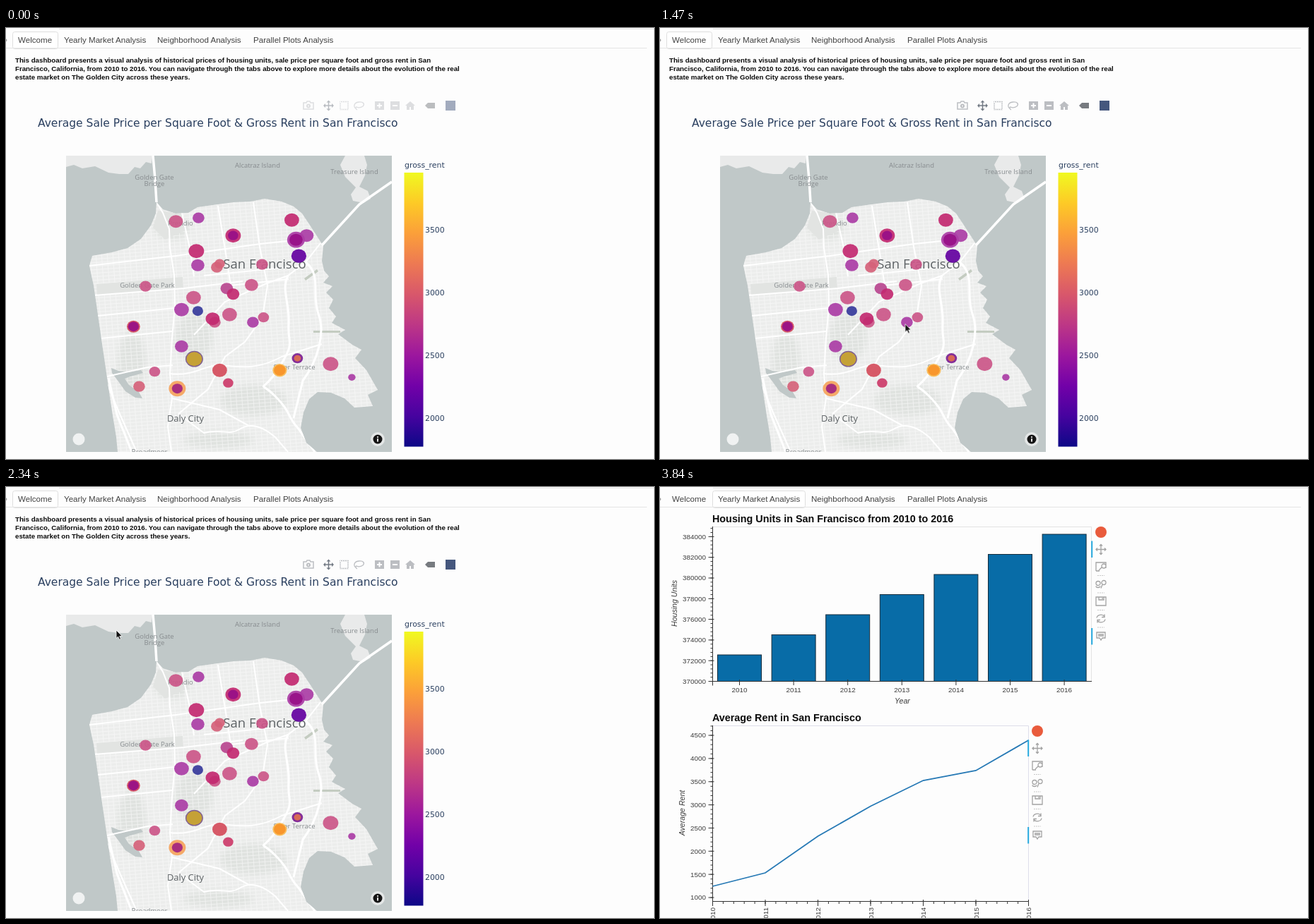
Recreate the animation shown at these times as an HTML page. Size 917 by 611 pixels, loop 3870 ms.

```html
<!DOCTYPE html>
<html lang="en">
<head>
<meta charset="utf-8">
<title>Housing dashboard</title>
<style>
html, body { margin: 0; width: 100%; height: 100%; overflow: hidden; background: #fdfdfd; }
svg { display: block; width: 100vw; height: 100vh; }
text { font-family: "Liberation Sans", Arial, sans-serif; fill: #3c3c3c; }
.tab { font-size: 11.6px; fill: #424242; }
.bold { font-weight: bold; fill: #0c0c0c; }
.intro { font-size: 9.72px; }
.head { font-size: 14.35px; }
.plot { font-family: "DejaVu Sans", Verdana, sans-serif; fill: #2a3f5f; }
.place { font-family: "Open Sans", sans-serif; text-anchor: middle; fill: #868b8e; font-size: 9.4px; }
.tick { font-size: 9.9px; }
.end { text-anchor: end; }
.mid { text-anchor: middle; }
.axis { font-size: 10.6px; font-style: italic; text-anchor: middle; }
.tip text { font-size: 11.7px; fill: #fff; }

.play { animation: 3870ms linear infinite; }
#welcome { animation-name: first; }
#yearly { animation-name: second; }
#modebar { animation-name: modebar; }
#tip { animation-name: tip; }
#hover { animation-name: hover; }
#cursor { animation-name: travel; }
#arrow { animation-name: arrow; }
#hand { animation-name: hand; }
#welcome, #yearly, #tip, #hover, #arrow, #hand { animation-timing-function: step-end; }

@keyframes first { 0% { visibility: visible } 82.2%, 100% { visibility: hidden } }
@keyframes second { 0% { visibility: hidden } 82.2%, 100% { visibility: visible } }
@keyframes modebar {
  0% { opacity: .5 } 5%, 31% { opacity: 0 } 37%, 68% { opacity: 1 } 73%, 100% { opacity: 0 }
}
@keyframes tip { 0% { opacity: 0 } 40% { opacity: 1 } 50.5%, 100% { opacity: 0 } }
@keyframes hover { 0% { opacity: 0 } 72.9% { opacity: 1 } 82.2%, 100% { opacity: 0 } }
@keyframes arrow { 0% { opacity: 0 } 3% { opacity: 1 } 72.9% { opacity: 0 } 85.5%, 100% { opacity: 1 } }
@keyframes hand { 0% { opacity: 0 } 72.9% { opacity: 1 } 85.5%, 100% { opacity: 0 } }
@keyframes travel {
  0%, 3% { transform: translate(640px, 616px); animation-timing-function: ease-out }
  10.85% { transform: translate(437px, 356px); animation-timing-function: ease-in-out }
  28.68% { transform: translate(301px, 338px); animation-timing-function: ease-in-out }
  40%, 50% { transform: translate(350px, 425px); animation-timing-function: ease-in-out }
  60.47% { transform: translate(156px, 203px); animation-timing-function: ease-in-out }
  73.5%, 84% { transform: translate(108px, 15px); animation-timing-function: ease-in }
  97%, 100% { transform: translate(744px, 622px) }
}
</style>
</head>
<body>
<svg viewBox="0 0 917 611" preserveAspectRatio="none">
  <defs>
    <linearGradient id="plasma" x1="0" y1="1" x2="0" y2="0"></linearGradient>
    <pattern id="blocks" width="8" height="5" patternUnits="userSpaceOnUse" patternTransform="rotate(-4)">
      <path d="M0 .5H8M.5 0V5" stroke="#fafafa" stroke-width=".9"/>
    </pattern>
    <clipPath id="frame"><rect x="85" y="181" width="461" height="420"/></clipPath>
    <path id="city" d="M213 247L222 257 240 263 258 262 271 254 300 250 322 247 346 246 366 242 390 246 407 253 419 263 429 278 440 295 449 309 447 330 450 344 457 352 449 361 462 366 453 375 463 385 457 397 467 409 461 418 480 428 470 434 490 449 503 456 494 468 510 485 526 513 512 520 519 536 493 538 479 525 460 517 441 516 429 526 421 545 417 567 425 588 440 601H158L156 580 148 530 140 475 132 420 124 365 118 337 122 323 150 318 172 312 191 299 205 280 212 263Z"/>
    <clipPath id="land"><use href="#city"/></clipPath>
    <filter id="soft"><feGaussianBlur stdDeviation="5"/></filter>
  </defs>

  <rect width="917" height="611" fill="#fdfdfd"/>

  <g id="welcome" class="play">
    <rect x="9.5" y="5.5" width="64" height="24" rx="3" fill="#fff" stroke="#dedede"/>
    <g id="intro"></g>
    <g id="modebar" class="play" fill="none" stroke="#bcbec2" stroke-width="2">
      <path d="M421 106h4l1-2h4l1 2h4v9h-14zM473 104.500h11v11h-11z" stroke-width="1.500"/>
      <circle cx="428" cy="110.500" r="2"/>
      <path d="M473 104.500h11v11h-11z" stroke="#fdfdfd" stroke-dasharray="1 2"/>
      <path d="M450 110H463M456.500 104V116" stroke="#737a84" stroke-width="1.500"/>
      <path d="M449 110l3-3v6zM464 110l-3-3v6zM456.500 102.500l-3 3h6zM456.500 117.500l-3-3h6z" fill="#737a84" stroke="none"/>
      <path d="M496 115c-5-3-4-9 3-10 7-1 9 3 6 6-3 2-7 2-9 1-2 0-1 3 1 4" stroke-width="1.300"/>
      <path d="M522 104h13v12h-13zM544 104h13v12h-13z" fill="#bcbec2" stroke="none"/>
      <path d="M525 110h7M528.500 106.500v7M547 110h7" stroke="#fff"/>
      <path d="M565 110l7-6 7 6h-2v6h-4v-4h-2v4h-4v-6z" fill="#bcbec2" stroke="none"/>
      <path d="M593 110l4-4h10v8h-10z" fill="#777b80" stroke="none"/>
      <rect x="622" y="103" width="14" height="14" fill="#45577d" stroke="none"/>
    </g>
    <text class="plot" x="45" y="140" font-size="15.5">Average Sale Price per Square Foot &amp; Gross Rent in San Francisco</text>

    <g clip-path="url(#frame)">
      <rect x="85" y="181" width="461" height="420" fill="#c0c8c8"/>
      <path d="M85 181H207L206 192 198 190 190 199 182 197 173 207 160 207 145 205 126 196 108 199 96 194 85 197ZM480 181H507L511 194 508 209 500 225 512 231 516 242 506 248 491 245 488 236 495 226 480 211 473 194Z" fill="#e9eaea"/>
      <use href="#city" fill="#ecedec"/>
      <g clip-path="url(#land)">
        <g fill="#dfe2df" filter="url(#soft)">
          <ellipse cx="235" cy="283" rx="25" ry="17"/>
          <ellipse cx="266" cy="438" rx="27" ry="34"/>
          <ellipse cx="350" cy="528" rx="47" ry="22"/>
          <ellipse cx="178" cy="475" rx="20" ry="45"/>
          <ellipse cx="300" cy="584" rx="50" ry="12"/>
        </g>
        <rect x="85" y="181" width="461" height="420" fill="url(#blocks)" opacity=".65"/>
        <path d="M128 363L250 353 251 369 129 379ZM215 259L250 263 258 285 225 300 208 283Z" fill="#e2e4e2"/>
        <path d="M149 482l10 4 14 2 18-3 3 4-18 5-8 3 6 9 14 10 5 9-10-1-14-9-10-14-9-12z" fill="#c0c8c8"/>
        <path d="M435 429h38v3h-38zM422 355l18-13 2 3-18 13z" fill="#c4ccc1"/>
        <g fill="none" stroke="#fff" stroke-width="2">
          <path d="M213 247L222 262 231 285 232 312 238 350 239 395 235 440 232 490 235 525 229 565 234 601"/>
          <path d="M118 337L240 323 360 306 435 298M125 379L252 369 335 359M130 408L238 397M134 440L235 430M143 494L200 481 236 478"/>
          <path d="M249 262L260 312 266 352M300 252L311 320 318 365M350 247L359 310 370 365 363 410 338 445 310 466 286 512 244 547"/>
          <path d="M445 305L424 332 399 351 369 362 310 388 266 435M280 351L430 336M318 365L400 356"/>
          <path d="M232 490C265 495 283 476 305 478S354 486 390 466L447 448M133 480L160 545 185 601"/>
          <path d="M244 547L280 574C305 568 316 578 330 569S360 562 381 580L399 601M235 525L302 541 344 564"/>
        </g>
        <path d="M399 351C389 372 402 390 400 420S411 442 386 482 356 497 380 521 398 551 413 567L437 601M424 332C447 350 432 378 442 405S442 470 420 500L407 553M145 496L157 548 178 601" fill="none" stroke="#fff" stroke-width="3"/>
      </g>
      <path d="M208 181L211 215 213 247M447 308L500 250 546 218" fill="none" stroke="#fff" stroke-width="3.5"/>
      <g id="places"></g>
      <circle cx="103" cy="583" r="8.500" fill="#f0f2f2"/>
      <circle cx="526" cy="583" r="10" fill="#e4e7e7"/>
      <circle cx="526" cy="583" r="6.500" fill="#151515"/>
      <path d="M526 579v1.800M526 582v4.500" stroke="#fff" stroke-width="1.800"/>
      <g id="homes" fill-opacity=".92"></g>
    </g>

    <rect x="563.5" y="205" width="27" height="388.5" fill="url(#plasma)"/>
    <g id="scale"></g>

    <g id="tip" class="play tip">
      <path d="M364 389H585V445H364V423L357 417 364 411Z" fill="#99078c" stroke="#f4e5f2"/>
      <g id="tiptext"></g>
    </g>
    <rect id="hover" class="play" x="74" y="6" width="132" height="22" fill="#e6e6e6"/>
  </g>

  <g id="yearly" class="play">
    <rect x="74.500" y="5.500" width="131" height="24" rx="3" fill="#fff" stroke="#dedede"/>
    <g id="charts"></g>
  </g>

  <path d="M75 1.500H917M0 28.500H907" stroke="#e5e5e5"/>
  <path d="M0 15.500l1 1.500-1 2" fill="none" stroke="#888"/>
  <g id="tabs"></g>

  <g id="cursor" class="play">
    <path id="arrow" class="play" d="M0 0V11.500L2.600 9.200 4.500 13.300 6.500 12.400 4.700 8.500H8.300Z" fill="#111" stroke="#fff" stroke-width=".8"/>
    <path id="hand" class="play" d="M0 1C0-.5 2-.5 2.200 1L3 5 4 4.300 5 5.200 6 4.600 7 5.700 8.200 5.500 8.700 9 7.500 13H2.200L-2 8.300C-2.500 7-1 6.500 .9 8Z" fill="#fff" stroke="#222"/>
  </g>
</svg>

<script>
const put = (id, parts) => { document.getElementById(id).innerHTML = parts.join(''); };
const text = (cls, x, y, s, extra = '') => `<text class="${cls}" x="${x}" y="${y}" ${extra}>${s}</text>`;
const path = (d, stroke = '#333', extra = '') => `<path d="${d}" fill="none" stroke="${stroke}" ${extra}/>`;
const upright = (cls, x, y, s) => text(cls, x, y, s, `transform="rotate(-90 ${x} ${y})"`);
const range = n => [...Array(n).keys()];

put('tabs', [[17, 'Welcome'], [82, 'Yearly Market Analysis'], [214, 'Neighborhood Analysis'],
  [350, 'Parallel Plots Analysis']].map(([x, s]) => text('tab', x, 21, s)));

put('intro', [
  'This dashboard presents a visual analysis of historical prices of housing units, sale price per square foot and gross rent in San',
  'Francisco, California, from 2010 to 2016. You can navigate through the tabs above to explore more details about the evolution of the real',
  'estate market on The Golden City across these years.'
].map((s, i) => text('bold intro', 13, 49 + 12.2 * i, s)));

put('places', [
  [356, 198, 'Alcatraz Island'], [210, 215, 'Golden Gate'], [210, 224, 'Bridge'],
  [493, 207, 'Treasure Island'], [247, 280, 'Presidio'], [200, 368, 'Golden Gate Park'],
  [408, 484, 'Silver Terrace'], [203, 604, 'Broadmoor'],
  [254, 558, 'Daly City', 12.9], [366, 341, 'San Francisco', 18.5]
].map(([x, y, s, size = 9.5]) =>
  text('place', x, y, s, `style="font-size:${size}px${size > 10 ? ';fill:#5c6164' : ''}"`)));

// Each colour holds x, y and radius; rings come before their cores.
const homes = {
  '#cb5688': [[240, 274, 9.5], [265, 382, 10], [316, 406, 10], [347, 364, 9], [459, 476, 10.5], [197, 366, 8],
    [364, 410, 7.5], [362, 335, 8], [210, 487, 7.5], [295, 417, 8]],
  '#b9468f': [[312, 369, 8.5]],
  '#d5627a': [[298, 339, 8], [302, 334, 7], [188, 508, 8]],
  '#c22970': [[404, 272, 10], [269, 316, 10.5], [321, 377, 8.5], [292, 412, 9.5], [321, 294, 10.5]],
  '#cc3b69': [[314, 503, 7]],
  '#aa3da5': [[272, 269, 8], [425, 294, 9.5], [271, 336, 9], [248, 399, 10], [248, 451, 9], [349, 417, 8],
    [489, 495, 5], [410, 300, 12]],
  '#d44c5b': [[180, 423, 9], [302, 485, 10]],
  '#970f87': [[321, 294, 7], [410, 300, 9], [180, 423, 7.3]],
  '#6300a0': [[414, 323, 10.2]],
  '#36399b': [[271, 401, 7.3]],
  '#77548a': [[266, 469, 12]],
  '#cba72f': [[266, 469, 10.5]],
  '#f5a35c': [[242, 511, 11.5]],
  '#a12480': [[242, 511, 7.3]],
  '#fabb52': [[387, 485, 9.7]],
  '#f79328': [[387, 485, 8]],
  '#7b1d91': [[412, 468, 7.5]],
  '#e17050': [[412, 468, 4.7]]
};
// The dots are slightly wider than tall.
put('homes', Object.entries(homes).flatMap(([fill, spots]) => spots.map(([x, y, r]) =>
  `<ellipse cx="${x + .4}" cy="${y + .2}" rx="${r * 1.04}" ry="${r * .95}" fill="${fill}"/>`)));

const plasma = ['0d0887', '46039f', '7201a8', '9c179e', 'bd3786', 'd8576b', 'ed7953', 'fb9f3a', 'fdca26', 'f0f921'];
put('plasma', plasma.map((c, i) => `<stop offset="${i / 9}" stop-color="#${c}"/>`));
put('scale', [text('plot', 564, 198, 'gross_rent', 'font-size="10.9"'),
  ...range(4).map(i => text('plot', 593, 290 + 89 * i, 3500 - 500 * i, 'font-size="10.9"'))]);

put('tiptext', ['sale_price_sqr_foot=418.9156225067234', 'lat=37.75184', 'lon=−122.4252',
  'gross_rent=2555.1666666666665'].map((s, i) => text('', 366, 400.5 + 13.5 * i, s)));

function toolbar(x, y) {
  const gray = '#a3a3a3';
  const at = (row, d) => `<g transform="translate(${x} ${y + row * 24.5})">${path(d, gray, 'stroke-width="1.3"')}</g>`;
  return [
    `<circle cx="${x}" cy="${y}" r="8" fill="#e95b3c"/>`,
    at(1, 'M-7 0H7M0-7V7M-5-2l-2 2 2 2M5-2l2 2-2 2M-2-5l2-2 2 2M-2 5l2 2 2-2'),
    at(2, 'M-7 6V-6H7V2M-7 6H-2M-3 5l4-4M1-1a3 3 0 1 0 6 0a3 3 0 1 0-6 0'),
    at(3, 'M-7-1a3 3 0 1 0 6 0a3 3 0 1 0-6 0M-7 3a3 2 0 0 0 6 0M1-2a3 3 0 1 0 6 0a3 3 0 1 0-6 0M2 1l-2 5'),
    at(4, 'M-7-6H7V6H-7ZM-3-6V-2H4V-6M2-5v2'),
    at(5, 'M-6-1a6 5 0 0 1 11-2M5-6v4H1M6 1a6 5 0 0 1-11 2M-5 6v-4h4'),
    at(6, 'M-6-5H6V3H2L0 6-2 3H-6ZM-4-2H4M-4 0H4'),
    ...[2, 3, 4, 5].map(r => path(`M${x - 5} ${y + r * 24.5 + 12.5}h10`, '#c8c8c8', 'stroke-dasharray="2 1"')),
    ...[12.5, 136].map(d => path(`M${x - 12.8} ${y + d}v23.5`, '#26a9df', 'stroke-width="2"'))
  ];
}

// Value axis: labels run upwards from y0, with four minor ticks between them.
function valueAxis(x, y0, step, count, first, gap, top) {
  const parts = [path(`M${x} ${top}V${y0 + 6}`)];
  for (let y = y0; y > top; y -= step / 5) parts.push(path(`M${x - 3} ${y}H${x}`));
  range(count).forEach(i => {
    const y = y0 - step * i;
    parts.push(path(`M${x - 6} ${y}H${x + 2}`), text('tick end', x - 9.5, y + 3.4, first + gap * i));
  });
  return parts;
}

const rents = [566, 547, 495, 452.5, 416, 402, 359];
const yearX = i => 74.5 + 74.5 * i;
put('charts', [
  text('bold head', 74, 50, 'Housing Units in San Francisco from 2010 to 2016'),
  path('M74.5 56.500H610.500V275', '#e3e3e3'),
  ...range(7).flatMap(i => {
    const x = 81.5 + 76.6 * i, y = 238 - 28.5 * i;
    return [
      `<rect x="${x}" y="${y}" width="62" height="${275.5 - y}" fill="#086ca7" stroke="#152b3a"/>`,
      path(`M${x + 31} 273V281`), text('tick mid', x + 31, 291, 2010 + i)
    ];
  }),
  path('M74 275.500H611'),
  ...valueAxis(74.5, 275.5, 29.3, 8, 370000, 2000, 56),
  upright('axis', 24, 165, 'Housing Units'),
  text('axis', 343, 307, 'Year'),
  ...toolbar(624, 64),

  text('bold head', 74, 332, 'Average Rent in San Francisco'),
  path('M74.500 338.500H521.500V587', '#dedeea'),
  path('M74 587.500H521.500'),
  ...range(31).map(i => path(`M${74.5 + 14.9 * i} 587v4`)),
  ...range(7).flatMap(i => [path(`M${yearX(i)} 585V594`), upright('tick end', yearX(i) + 3.5, 596, 2010 + i)]),
  ...valueAxis(74.5, 582, 32.85, 8, 1000, 500, 338),
  upright('axis', 35, 462, 'Average Rent'),
  path('M' + rents.map((y, i) => `${yearX(i)} ${y}`).join('L'), '#2679b5', 'stroke-width="1.8"'),
  ...toolbar(534, 346)
]);
</script>
</body>
</html>
```
